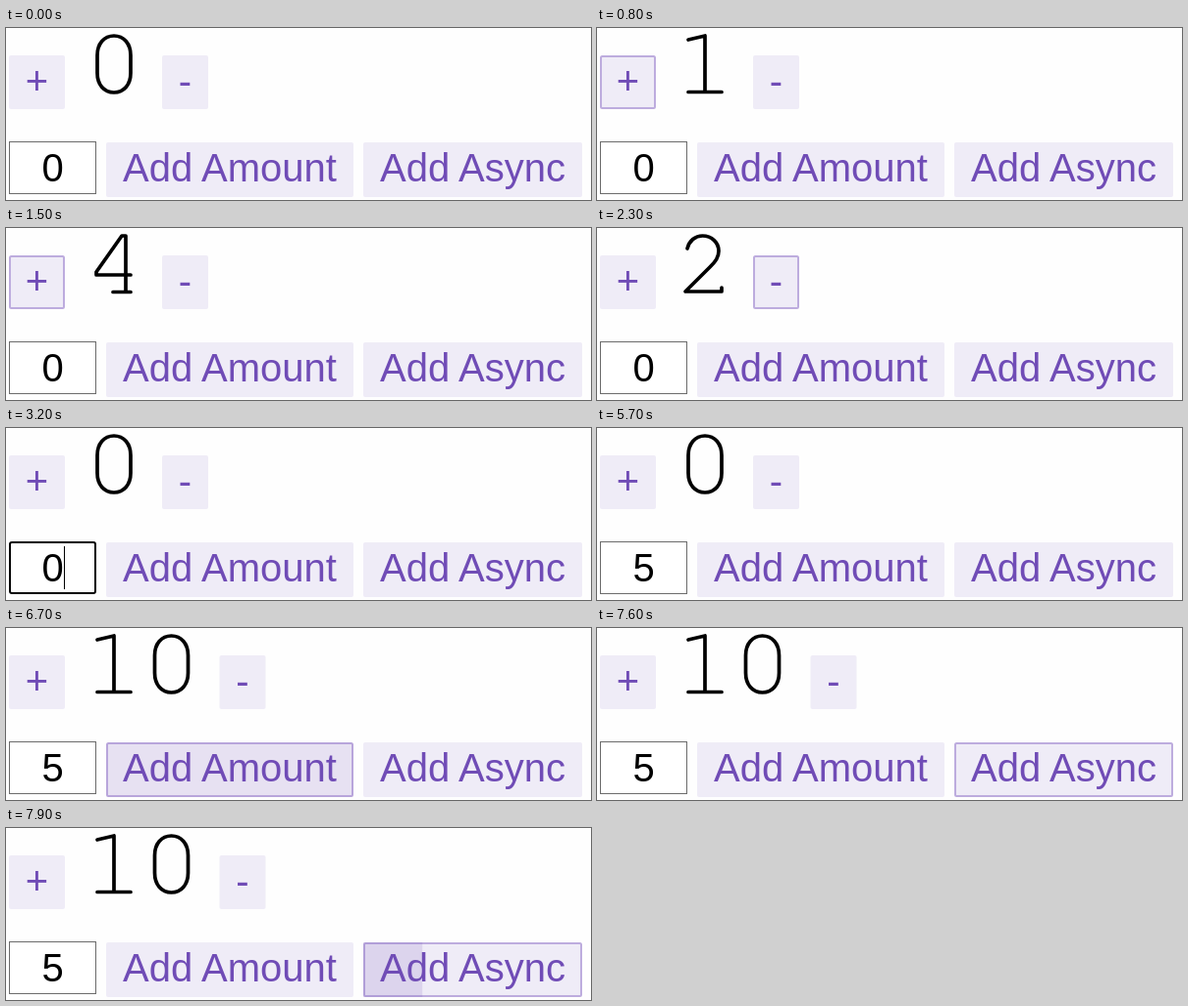
Recreate the animation shown at these times as an HTML page. Size 596 by 176 pixels, loop 8000 ms.

```html
<!DOCTYPE html>
<html lang="en">
<head>
<meta charset="utf-8">
<title>Counter</title>
<style>
  html, body { margin: 0; width: 100%; height: 100%; overflow: hidden; background: #fefefe; }
  svg { display: block; width: 596px; height: 176px; }
  text { font: 40px "Liberation Sans", Arial, sans-serif; text-anchor: middle; }
  .btn text { fill: rgb(112, 76, 182); }
  .btn .face { fill: rgba(112, 76, 182, .1); }
  .btn .edge { fill: none; stroke: rgba(112, 76, 182, .4); stroke-width: 2; }
  #count path { fill: none; stroke: #000; stroke-width: 3.7; stroke-linecap: round; stroke-linejoin: round; }
  #field { fill: #fff; }
  #fill { fill: rgba(112, 76, 182, .15); }
</style>
</head>
<body>
<svg viewBox="0 0 596 176">
  <g id="count"></g>
  <rect id="field"/>
  <rect id="selection" x="36" y="121" width="23" height="45" fill="#3390ff"/>
  <text id="amount" x="47.5" y="157"></text>
  <rect id="caret" x="59" y="121" width="1" height="44"/>
  <rect id="fill" x="364" y="117" height="56"/>
</svg>
<script>
  const LOOP = 8000;
  const svg = document.querySelector('svg');
  const $ = id => document.getElementById(id);

  function make(tag, attrs, parent) {
    const el = document.createElementNS('http://www.w3.org/2000/svg', tag);
    set(el, attrs);
    parent.append(el);
    return el;
  }

  function set(el, attrs) {
    for (const key in attrs) el.setAttribute(key, attrs[key]);
  }

  function button(label, x, y, w, h, baseline) {
    const g = make('g', { class: 'btn' }, svg);
    const face = make('rect', { class: 'face', x, y, width: w, height: h, rx: 2 }, g);
    const edge = make('rect', { class: 'edge', x: x + 1, y: y + 1, width: w - 2, height: h - 2, rx: 1.5 }, g);
    make('text', { x: x + w / 2, y: baseline }, g).textContent = label;
    return { g, face, edge };
  }

  const buttons = {
    plus: button('+', 3, 28, 57, 55, 68),
    minus: button('-', 159, 28, 47, 55, 68),
    add: button('Add Amount', 102, 117, 252, 56, 157),
    async: button('Add Async', 364, 117, 223, 56, 157)
  };

  // Thin slab-serif numerals, drawn in the first digit's cell
  const digits = [
    'M110 8C120 8 127 16 127 28V46C127 58 120 66 110 66S93 58 93 46V28C93 16 100 8 110 8Z',
    'M93 12L110 8V65.5M93 65.5H127',
    'M92 21C94 13 100 8 107.5 8C117 8 124 15 124 23.5C124 30 121 34 115 40L90 65H127V61',
    'M93 14C97 10 102 8 108 8C117 8 123 14 123 21.5C123 30 116 35 105 35C118 35 127 41 127 50.5C127 60 119 66 107 66C100 66 94 64 90 60',
    'M127 48H92V45L118 8H122V65M109 65.5H127',
    'M122 8H98V33C101 31 105 30 110 30C120 30 127 37 127 47.5C127 59 118 66 108 66C101 66 95 63 91 59'
  ];
  const places = [0, 58.5].map(x => make('path', { transform: `translate(${x})` }, $('count')));

  // Values hold until the next change
  const start = {
    count: 0, amount: 0, field: 'rest', mark: 'none',
    plus: 0, minus: 0, add: 0, async: 0, held: false, fill: 0
  };
  const changes = [
    [200, { minus: .5 }], [300, { minus: 0 }],
    [500, { plus: .5 }], [600, { plus: 1 }],
    [800, { count: 1 }], [1100, { count: 2 }], [1300, { count: 3 }], [1500, { count: 4 }],
    [1600, { minus: .5 }], [1700, { minus: 1 }],
    [2000, { plus: 0, count: 3 }], [2300, { count: 2 }], [2500, { count: 1 }], [2700, { count: 0 }],
    [2900, { field: 'hover' }],
    [3100, { field: 'focus', mark: 'caret', minus: .5 }], [3200, { minus: 0 }],
    [3900, { mark: 'selection' }],
    [4800, { add: 1 }],
    [5200, { amount: 5, mark: 'caret' }],
    [5500, { add: 0 }],
    [5700, { field: 'rest', mark: 'none' }],
    [5900, { add: .5 }], [6000, { add: 1, held: true }],
    [6300, { count: 5 }], [6700, { count: 10 }],
    [7000, { async: .5 }], [7100, { async: 1 }],
    [7600, { add: 0, held: false }]
  ];

  function stateAt(t) {
    const s = { ...start };
    for (const [at, change] of changes) if (t >= at) Object.assign(s, change);
    // One second to cross the button, refreshed every 100 ms
    s.fill = Math.max(0, (Math.floor(t / 100) * 100 - 7630) / 1000) * 223;
    return s;
  }

  function draw(s) {
    const shown = String(s.count);
    places.forEach((p, i) => p.setAttribute('d', i < shown.length ? digits[shown[i]] : ''));
    buttons.minus.g.setAttribute('transform', `translate(${(shown.length - 1) * 58.5})`);

    for (const name in buttons) buttons[name].edge.style.opacity = s[name];
    buttons.add.face.style.fill = s.held ? 'rgba(112, 76, 182, .16)' : '';
    $('fill').setAttribute('width', s.fill);

    const focus = s.field === 'focus';
    const line = focus ? 2 : 1;
    set($('field'), {
      x: 3 + line / 2, y: 116 + line / 2, width: 89 - line, height: 54 - line,
      rx: focus ? 2 : 0, 'stroke-width': line,
      stroke: { rest: '#6b6b6b', hover: '#4f4f4f', focus: '#000' }[s.field]
    });
    $('amount').textContent = s.amount;
    $('amount').style.fill = s.mark === 'selection' ? '#fff' : '#000';
    for (const id of ['caret', 'selection']) $(id).style.opacity = s.mark === id ? 1 : 0;
  }

  const began = performance.now();
  function tick() {
    draw(stateAt((performance.now() - began) % LOOP));
    requestAnimationFrame(tick);
  }
  tick();
</script>
</body>
</html>
```
